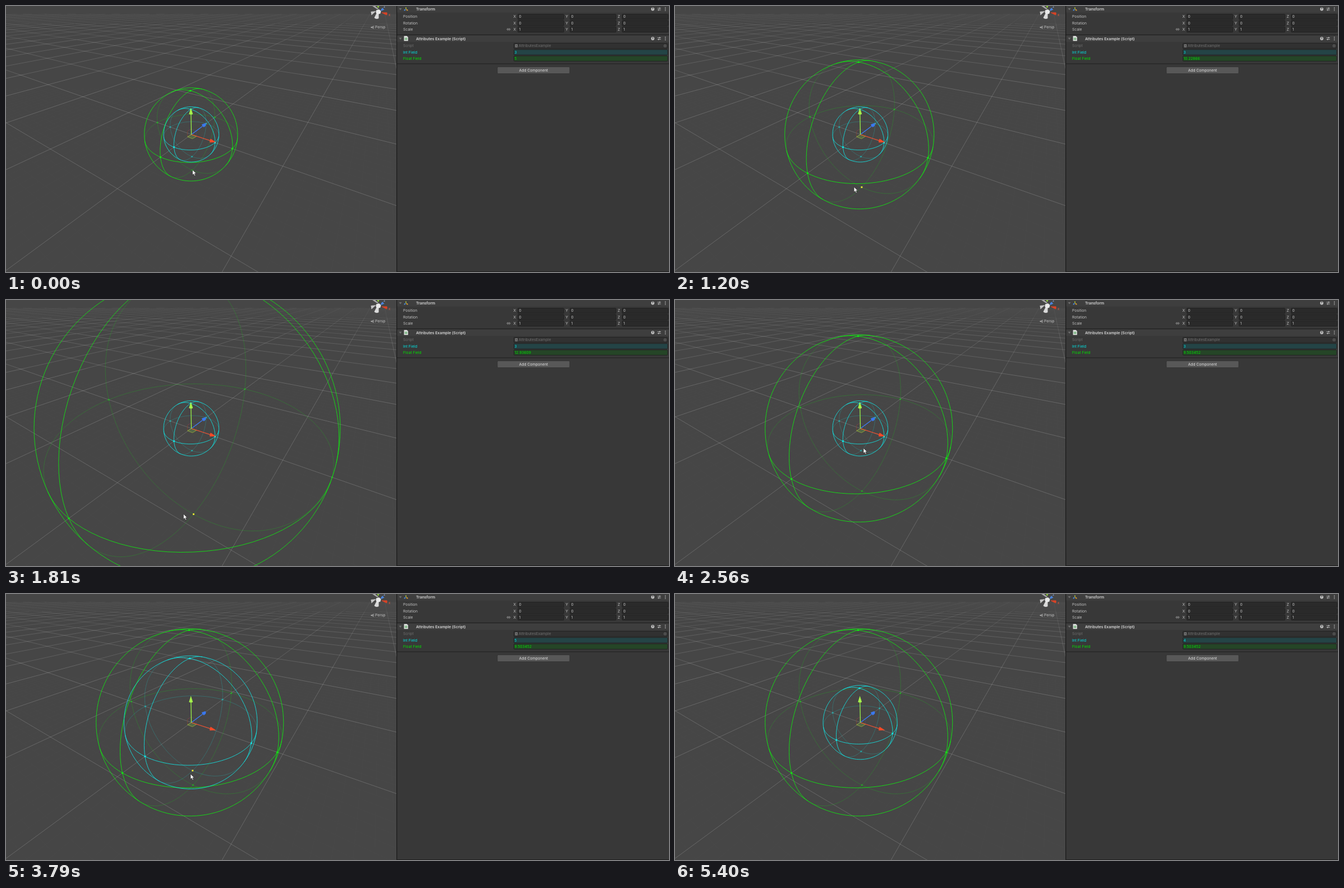
Recreate the animation shown at these times as an HTML page. Size 1182 by 474 pixels, loop 6180 ms.

```html
<!DOCTYPE html>
<html lang="en">
<head>
<meta charset="utf-8">
<title>Radius handles</title>
<style>
html, body { margin: 0; width: 100%; height: 100%; overflow: hidden; background: #383838; }
svg { display: block; width: 1182px; height: 474px; }
text { font: 6.7px Inter, Roboto, sans-serif; fill: #c4c4c4; white-space: pre; }
.bold { font-size: 6.8px; font-weight: 600; fill: #d8d8d8; }
.mid { text-anchor: middle; }
</style>
</head>
<body>
<svg id="stage" viewBox="0 0 1182 474" xmlns="http://www.w3.org/2000/svg"></svg>
<script>
const LOOP = 6180, LAG = 50, STEP = 100 / 3, PHASE = 6.6;
const GREEN = '#10ee10', CYAN = '#12e6e6';
const stage = document.getElementById('stage');

// Camera
const F = 415.5, CX = 348, CY = 228.8, O = [-1.072, 0, 25.5];
const rad = a => a * Math.PI / 180;
const s = Math.sin(rad(33.5)), c = Math.cos(rad(33.5));
const sp = Math.sin(rad(30.8)), cp = Math.cos(rad(30.8));
const EX = [c, s * sp, -s * cp], EY = [0, -cp, -sp], EZ = [s, -c * sp, c * cp];

const dot = (a, b) => a[0] * b[0] + a[1] * b[1] + a[2] * b[2];
const mix = (a, p, b, q) => a.map((v, i) => v * p + b[i] * q);
const screen = p => [CX + F * p[0] / p[2], CY + F * p[1] / p[2]];
const fmt = p => p[0].toFixed(1) + ' ' + p[1].toFixed(1);
const DIST = Math.sqrt(dot(O, O));
const SIDE = [O[2] / DIST, 0, -O[0] / DIST], DOWN = [0, 1, 0];

// Monotone cubic through [time, value] keys
function curve(keys, t) {
  const n = keys.length - 1;
  if (t <= keys[0][0]) return keys[0][1];
  if (t >= keys[n][0]) return keys[n][1];
  const rate = i => (keys[i + 1][1] - keys[i][1]) / (keys[i + 1][0] - keys[i][0]);
  const slope = i => {
    if (i === 0 || i === n) return 0;
    const a = rate(i - 1), b = rate(i);
    return a * b <= 0 ? 0 : 2 * a * b / (a + b);
  };
  let i = 0;
  while (t > keys[i + 1][0]) i++;
  const h = keys[i + 1][0] - keys[i][0], u = (t - keys[i][0]) / h, v = 1 - u;
  return v * v * ((1 + 2 * u) * keys[i][1] + u * h * slope(i)) +
         u * u * ((1 + 2 * v) * keys[i + 1][1] - v * h * slope(i + 1));
}

const FLOAT = [[610, 5], [890, 15.65914], [940, 17], [985, 17.6], [1190, 7.5], [1360, 13.81293],
  [1410, 13.85], [1610, 8], [1815, 14], [2090, 9.503452]];
const INT = [[2790, 3], [3010, 6.2], [3200, 3], [3400, 6.2], [3610, 3], [3720, 5.2], [3770, 7],
  [3840, 8.2], [4060, 3.2], [4190, 7.1], [4240, 9], [4290, 9.3], [4500, 4]];
const MOUSE_X = [[610, 332.5], [940, 325], [1410, 315.5], [2090, 318], [2260, 335.5], [2600, 336],
  [2790, 336], [3770, 329], [4240, 323.5], [4770, 324], [5390, 1164]];
const MOVE_Y = [[2090, 341], [2260, 262.5], [2600, 264]];
const GRIP_Y = [[2790, -5], [3010, 6], [4300, 6], [4500, -1]];
const EXIT_Y = [[4770, 280], [5390, 468]];

const floatAt = t => curve(FLOAT, t);
const intAt = t => Math.round(curve(INT, t));
const bottomY = r => screen(mix(O, 1, EY, -r))[1];

function mouseY(t) {
  if (t < 2090) return bottomY(floatAt(t)) - 0.5;
  if (t < 2790) return curve(MOVE_Y, t);
  if (t < 4770) return bottomY(curve(INT, t)) + curve(GRIP_Y, t);
  return curve(EXIT_Y, t);
}

// Static markup
const rect = (x, y, w, h, fill, extra = '') =>
  `<rect x="${x}" y="${y}" width="${w}" height="${h}" fill="${fill}" ${extra}/>`;
const label = (x, y, str, extra = '') => `<text x="${x}" y="${y + 2.4}" ${extra}>${str}</text>`;
const line = (d, color, w = 1, extra = '') =>
  `<path d="${d}" fill="none" stroke="${color}" stroke-width="${w}" ${extra}/>`;
const fill = (d, color) => `<path d="${d}" fill="${color}"/>`;
const field = (x, y, w, bg = '#2a2a2a') =>
  rect(x + .5, y - 4.5, w - 1, 9.4, bg, 'rx="1" stroke="#1f1f1f" stroke-width=".8"');

function gridPath(step, count, near, far) {
  let d = '';
  for (let k = -count; k <= count; k++) {
    const q = k * step;
    const alongZ = depth => mix(mix(O, 1, EX, q), 1, EZ, (depth - O[2] - q * EX[2]) / EZ[2]);
    const alongX = depth => mix(mix(O, 1, EZ, q), 1, EX, (depth - O[2] - q * EZ[2]) / EX[2]);
    for (const at of [alongZ, alongX])
      d += `M${fmt(screen(at(near)))}L${fmt(screen(at(far)))}`;
  }
  return d;
}

function grid() {
  const bands = [[1, 45, .19], [45, 80, .15], [80, 125, .1], [125, 190, .05]];
  return line(gridPath(1, 45, 2, 38), '#fff', .7, 'opacity=".018"') +
    bands.map(([a, b, o]) => line(gridPath(10, 24, a, b), '#fff', .9, `opacity="${o}"`)).join('');
}

const moveTool = () =>
  line('M324 222L331 219.5L340 223L339 232', '#5a4fa0', .7, 'opacity=".4"') +
  line('M323.5 233V223L330.5 219V229', '#b0402a', .8, 'opacity=".5"') +
  `<path d="M330.5 229L339.5 232.3L332.5 236.5L323.5 233Z" fill="#9af348" fill-opacity=".18" stroke="#8ea83c" stroke-width=".9"/>` +
  line('M330.5 229L350 214.5', '#3a7af8', 1.3) +
  fill('M349 211L355.5 208.8Q357 210.5 356 213.5L353 216Q349.6 215 349 211Z', '#3a78ee') +
  line('M330.5 229L365 240', '#f24a28', 1.3) +
  fill('M374.5 242.8L364.8 236.6Q362.6 239.5 363.2 243.2Z', '#f24a28') +
  line('M330.5 229L329.8 192', '#9af348', 1.3) +
  fill('M329.6 181.5L326.2 192.4Q329.8 194.4 333.2 192.4Z', '#a4f04c');

const viewGizmo = () =>
  fill('M660 9L650.5 10L651.5 16.5Z', '#c4c4c4') +
  fill('M662 6L653 0H658L664 5Z', '#a8a8a8') +
  fill('M661 12L656.5 21Q660 24.5 664.5 22L664.5 12Z', '#dadada') +
  fill('M663.5 4L661.5 0H665.5Z', '#8ecb3c') +
  fill('M668 7L671 3L674.5 6.5L669 9Z', '#4a83dc') +
  fill('M668.5 11.5L679 11.2Q681 13.6 678.5 16.5Z', '#d84326') +
  fill('M660 7.5L665 6L668.5 9L667.5 13.5L662.5 15L659.5 12Z', '#e8e8e8') +
  label(682, 15.2, 'x', 'style="fill:#e0563c;font-size:6px"') +
  label(673, 1, 'z', 'style="fill:#8fb4f0;font-size:6px"') +
  line('M656 35.8L650.5 38L656 40.2M656 38H651', '#bdbdbd', .8) +
  label(658, 38, 'Persp');

function header(y, h, mid, title) {
  let out = rect(697.5, y, 485, h, '#3e3e3e') +
    fill(`M700.6 ${mid - 1.6}H705.6L703.1 ${mid + 2}Z`, '#6f6f6f') +
    label(731, mid + .2, title, 'class="bold"') +
    `<circle cx="1153" cy="${mid}" r="2.9" fill="#c4c4c4"/>` +
    label(1153, mid - .5, '?', 'class="mid" style="fill:#333;font-size:5px;font-weight:700"') +
    line(`M1161.5 ${mid - 1.5}H1167.5M1161.5 ${mid + 1.5}H1167.5M1165.5 ${mid - 3}V${mid}M1163.5 ${mid}V${mid + 3}`, '#bcbcbc', .9);
  for (const k of [-2.5, 0, 2.5]) out += `<circle cx="1175.5" cy="${mid + k}" r=".8" fill="#c4c4c4"/>`;
  return out;
}

function vectorRow(y, name, value) {
  let out = label(708, y, name);
  ['X', 'Y', 'Z'].forEach((axis, i) => {
    const x = 912 + 93 * i;
    out += label(x - 7.5, y, axis) + field(x, y, 83) + label(x + 2.5, y, value);
  });
  return out;
}

const inspector = () =>
  rect(696, 0, 486, 474, '#383838') + rect(696, 0, 1.3, 474, '#1b1b1b') +
  header(0, 11.5, 5.5, 'Transform') +
  line('M713 5V2.5', '#b5d335', 1.6) + line('M712.5 6L709.8 8', '#4c8fe0', 1.6) + line('M713.5 6L716.4 8', '#e0a030', 1.6) +
  vectorRow(19, 'Position', 0) + vectorRow(30.3, 'Rotation', 0) + vectorRow(41.7, 'Scale', 1) +
  line('M895.5 40.2H894Q892 41.5 894 43H895.5M896.5 40.2H898Q900 41.5 898 43H896.5M894.5 41.6H897.5', '#a8a8a8', .8) +
  rect(697, 51, 485, 1, '#1c1c1c') +
  header(52, 12, 58, 'Attributes Example (Script)') +
  fill('M709.6 53.4H714.6L716.8 55.6V62.2H709.6Z', '#e6e6e6') +
  line('M711.8 56V61M714.4 56V61M710.8 57.4H715.6M710.8 59.6H715.6', '#3f9a4a', .7) +
  label(708, 71, 'Script', 'style="fill:#707070"') + field(905, 71, 275, '#313131') +
  rect(907.5, 68.2, 4.6, 5.4, '#777') + rect(909, 69.8, 1.6, 2.2, '#444') +
  label(914, 71, 'AttributesExample', 'style="fill:#707070"') +
  '<circle cx="1175" cy="71" r="2.2" fill="none" stroke="#777" stroke-width=".7"/><circle cx="1175" cy="71" r=".8" fill="#777"/>' +
  label(708, 82.2, 'Int Field', 'style="fill:#00e8e8"') + field(905, 82.2, 275, '#244446') +
  label(906.5, 82.2, '', 'id="intText" style="fill:#00dede"') +
  label(708, 93.4, 'Float Field', 'style="fill:#00e400"') + field(905, 93.4, 275, '#254527') +
  label(906.5, 93.4, '', 'id="floatText" style="fill:#00dc00"') +
  rect(697, 102.5, 485, 1, '#1f1f1f') +
  rect(876, 108.5, 129, 12, '#585858', 'rx="1.5" stroke="#303030" stroke-width=".7"') +
  label(940.5, 114.5, 'Add Component', 'class="mid" style="fill:#e4e4e4"') +
  rect(696, 473, 486, 1, '#1f1f1f');

const ball = (id, color) => `<g id="${id}">${line('', color, .8, 'opacity=".28"')}${line('', color, .85)}` +
  Array(6).fill(rect(0, 0, 2.8, 2.8, color)).join('') + '</g>';

stage.innerHTML =
  '<clipPath id="view"><rect width="696" height="474"/></clipPath>' +
  '<g clip-path="url(#view)">' + rect(0, 0, 696, 474, '#464646') + grid() +
  ball('floatBall', GREEN) + ball('intBall', CYAN) + moveTool() + viewGizmo() + '</g>' +
  inspector() +
  '<path id="mouse" d="M0 0V9.2L2.1 7.3L3.6 10.7L5.2 10L3.7 6.7H6.6Z" fill="#fff" stroke="#222" stroke-width=".6"/>';

const find = id => document.getElementById(id);
const floatBall = find('floatBall'), intBall = find('intBall'), mouse = find('mouse');
const floatText = find('floatText'), intText = find('intText');

function drawBall(node, r, color, held) {
  const SIDES = 120, paths = ['', ''];
  const facing = n => -dot(n, O) > r ? 1 : 0;
  for (const [a, b] of [[EX, EY], [EY, EZ], [EZ, EX]]) {
    const normal = i => mix(a, Math.cos(i * 2 * Math.PI / SIDES), b, Math.sin(i * 2 * Math.PI / SIDES));
    const at = i => fmt(screen(mix(O, 1, normal(i), r)));
    let last = -1;
    for (let i = 0; i < SIDES; i++) {
      const front = facing(normal(i + .5));
      if (front !== last) paths[front] += 'M' + at(i);
      paths[front] += 'L' + at(i + 1);
      last = front;
    }
  }
  // Outline seen from the camera
  const k = r * r / (DIST * DIST), rim = r * Math.sqrt(1 - k);
  for (let i = 0; i < SIDES; i++) {
    const a = i * 2 * Math.PI / SIDES;
    const p = mix(mix(O, 1 - k, SIDE, rim * Math.cos(a)), 1, DOWN, rim * Math.sin(a));
    paths[1] += (i ? 'L' : 'M') + fmt(screen(p));
  }
  paths[1] += 'Z';
  const kids = node.children;
  kids[0].setAttribute('d', paths[0]);
  kids[1].setAttribute('d', paths[1]);
  [EX, EY, EZ].forEach((axis, j) => [1, -1].forEach((sign, m) => {
    const n = mix(axis, sign, axis, 0), p = screen(mix(O, 1, n, r)), el = kids[2 + j * 2 + m];
    const grip = held && axis === EY && sign < 0;
    el.setAttribute('x', (p[0] - 1.4).toFixed(1));
    el.setAttribute('y', (p[1] - 1.4).toFixed(1));
    el.setAttribute('fill', grip ? '#f4f032' : color);
    el.setAttribute('opacity', grip || facing(n) ? 1 : .42);
  }));
}

function draw(t) {
  drawBall(floatBall, floatAt(t), GREEN, t >= 610 && t < 2090);
  drawBall(intBall, intAt(t), CYAN, t >= 2790 && t < 4510);
  floatText.textContent = Number(floatAt(t - LAG).toPrecision(7));
  intText.textContent = intAt(t - LAG);
  mouse.setAttribute('transform', `translate(${curve(MOUSE_X, t).toFixed(1)} ${mouseY(t).toFixed(1)})`);
  mouse.setAttribute('visibility', t < 5370 ? 'visible' : 'hidden');
}

const hold = t => 10 * Math.round((Math.floor((t - PHASE) / STEP) * STEP + PHASE) / 10);

const start = performance.now();
function tick() {
  draw(hold((performance.now() - start) % LOOP));
  requestAnimationFrame(tick);
}
tick();
</script>
</body>
</html>
```
